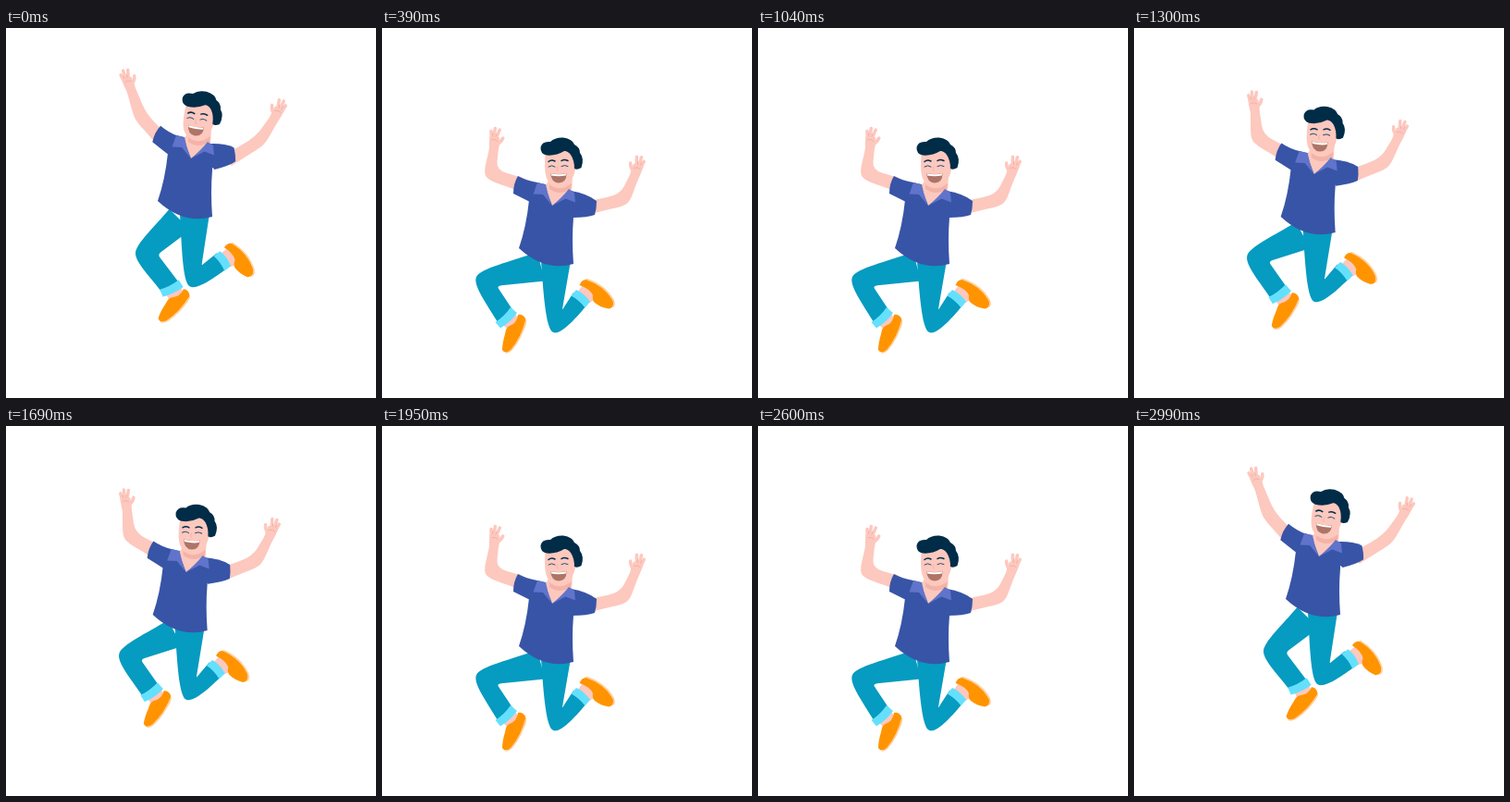
An HTML page for the animation above (3.12 s loop, 400 px wide and 400 px high).

```html
<!DOCTYPE html>
<html lang="en">
<head>
<meta charset="utf-8">
<title>Jumping man</title>
<style>
  html, body { margin: 0; width: 100%; height: 100%; overflow: hidden; background: #fff; }
  svg { display: block; width: 100%; height: 100%; }
  .skin { fill: #fdc8be; }
  .pants { fill: #069bc0; }
  .cuff { fill: #64e0fd; }
  .shoe { fill: #ff9400; }
  .sole { fill: none; stroke: #ffcf9c; stroke-width: 1.6; stroke-linecap: round; }
  .shirt { fill: #3854a6; }
  .flap { fill: #5f74ca; }
  .hair { fill: #002c47; }
  .brow { fill: none; stroke: #002c47; stroke-width: 1.5; stroke-linecap: round; }
  .eye { fill: none; stroke: #24507a; stroke-linecap: round; }
  .finger { fill: none; stroke: #fdc8be; stroke-width: 3.5; stroke-linecap: round; }
  .crease { fill: none; stroke: #eda99f; stroke-width: .7; stroke-linecap: round; }
</style>
</head>
<body>
<svg viewBox="0 0 400 400">
  <defs>
    <g id="hand">
      <path class="skin" d="M-5 1Q-6 -6 -6 -12Q0 -16 5 -12Q6 -5 5 1Z"/>
      <path class="finger" d="M-4 -11L-5 -18M-1.5 -12L-1 -21.5M1.5 -12L4 -20.5M3 -5Q7 -7 8.5 -12"/>
      <path class="crease" d="M-3.5 -9Q0 -11 3 -8M-2.7 -13L-3 -16M.6 -13L1.3 -16"/>
    </g>
  </defs>

  <g id="body">
    <path id="armL" class="skin"/>
    <path id="armR" class="skin"/>
    <g id="handL"><use href="#hand"/></g>
    <g id="handR"><use href="#hand" transform="scale(-1 1)"/></g>

    <path id="legR" class="pants"/>
    <g id="footR"><g transform="translate(-214 -293)">
      <path class="skin" d="M211 286L217 278Q228 283 230 294L222 298Z"/>
      <path class="shoe" d="M213.5 278Q216 271 222 272Q240 279 249 293Q253 302 245 303.5Q236 302 230 297Q227 294 228 289Q225 282 213.5 278Z"/>
      <path class="sole" d="M221 271.5Q241 278 250 294Q252 298 250 301"/>
      <path class="cuff" d="M204.5 289.5L210 283Q219 287 225 296L219.5 302.5Q213 294 204.5 289.5Z"/>
    </g></g>
    <path id="legL" class="pants"/>
    <g id="footL"><g transform="translate(-134.5 -313.5)">
      <path class="skin" d="M131 321L144 309L149 316L137 327Z"/>
      <path class="shoe" d="M147 310Q152 309 155 314Q157 320 153 326Q146 343 139 349Q133 353 130 348Q130 341 133 331Q134 323 138 322Q146 319 147 310Z"/>
      <path class="sole" d="M155.5 317Q151 335 140 348Q137 351 134 351"/>
      <path class="cuff" d="M122.5 318Q132 312 139 302L146 308Q139 318 128 324.5Z"/>
    </g></g>

    <path id="sleeveL" class="shirt" d="M168 167Q156 165 147 160Q142 168 142 179L160 188L176 192Z"/>
    <path id="sleeveR" class="shirt" d="M204 176Q222 179 232 187Q232 195 230 202Q222 205 206 205L196 190Z"/>
    <path class="shirt" d="M168 167L207 177V205Q205 228 207 255Q176 264 148 238Q156 215 159 186Z"/>
    <path class="skin" d="M181 164L206 160L205 177L184 192L176 171Z"/>
    <path fill="#f4b3a7" d="M181 169Q192 178 205 168L204 174Q192 182 181 174Z"/>
    <path class="flap" d="M168 167L177 169Q179 180 183.5 191.5L174 180L163.5 179.5Z"/>
    <path class="flap" d="M202 174L208 178L209 188.5L198.5 184.5L184 192Q195 183 202 174Z"/>

    <g id="head"><g transform="translate(-190 -149)">
      <path class="skin" d="M177 132Q174 158 180 166Q185 173 193 172Q206 169 209 153L210 134Z"/>
      <path class="hair" d="M178 137.5Q171 136 171.5 129Q173 122 182 123Q187 118 196 118.5Q206 120 208 126Q214 129 214 135Q219 141 215.5 151Q211 154 208 152Q208 143 204 137Q201 133 197 133Q188 138.5 178 137.5Z"/>
      <path class="brow" d="M180 144.5Q183 142 187 144M194 143.5Q197 141.5 201 143.5"/>
      <path class="eye" d="M180 150Q183.5 147.5 187 150M194 149.5Q197.5 147.5 201 149.5"/>
      <path class="crease" d="M190 150Q188 154 190.5 154.5"/>
      <path fill="#ad7567" d="M182 157Q191 159 199.500 157Q199.500 167.500 191 167.500Q183 167 182 157Z"/>
      <path fill="#fff" d="M182.500 157.300Q191 159 199.200 157.300L198.700 159.500Q191 161 183 159.500Z"/>
    </g></g>
  </g>
</svg>
<script>
const STEP = 130;

// Joints relative to the body as [high, mid, low]: x, y and, where needed, angle
const joints = {
  elbowL: [[130, 147], [118, 157], [120, 153]],
  wristL: [[119, 117], [121, 130], [121, 125]],
  elbowR: [[258, 173], [261, 185], [261, 180]],
  wristR: [[274, 149], [273, 160], [267, 149]],
  kneeL: [[136, 295], [113, 274], [115, 281]],
  ankleL: [[163, 333, 17], [134.5, 313.5, 0], [134, 321, 8]],
  kneeR: [[189, 319], [190, 317], [184, 317]],
  ankleR: [[217, 303, 13], [214, 293, 0], [210, 304, 12]],
  head: [[190, 149, 9], [190, 149, 0], [187, 147, -1]]
};
const shoulderL = [150, 169], shoulderR = [224, 194];
const hipL = [172, 258], hipR = [188, 252];

const el = id => document.getElementById(id);
const add = (p, d, k) => [p[0] + d[0] * k, p[1] + d[1] * k];
const mix = (p, q, k) => [p[0] + (q[0] - p[0]) * k, p[1] + (q[1] - p[1]) * k];
const unit = ([x, y]) => { const l = Math.hypot(x, y); return [x / l, y / l]; };
const text = (...points) => points.map(p => p.map(v => v.toFixed(2)).join(" ")).join(" ");

// Tapered two-part limb: round outside of the bend, inside softened by "soft"
function limb(id, a, b, c, [wa, wb, wc], round, soft) {
  const d1 = unit(add(b, a, -1)), d2 = unit(add(c, b, -1));
  const side = Math.sign(d1[0] * d2[1] - d1[1] * d2[0]);
  const normal = ([x, y]) => [y * side, -x * side];
  const along = unit(add(d1, d2, 1));
  const n1 = normal(d1), n2 = normal(d2), n = normal(along);
  const a1 = add(a, n1, wa), a2 = add(a, n1, -wa);
  const c1 = add(c, n2, wc), c2 = add(c, n2, -wc);
  const outer = add(b, n, wb), inner = add(b, n, -wb);
  el(id).setAttribute("d",
    "M" + text(a1) +
    "C" + text(mix(a1, add(b, n1, wb), .5), add(outer, along, -round), outer) +
    "C" + text(add(outer, along, round), mix(c1, add(b, n2, wb), .5), c1) +
    "L" + text(c2, mix(inner, c2, soft)) +
    "Q" + text(inner, mix(inner, a2, soft)) +
    "L" + text(a2) + "Z");
}

function place(id, [x, y], angle = 0) {
  el(id).setAttribute("transform", `translate(${x} ${y}) rotate(${angle})`);
}

// Direction from elbow to wrist, in degrees from upright
const lean = (e, w) => Math.atan2(w[0] - e[0], e[1] - w[1]) * 180 / Math.PI;

// s runs from 0 at the top of the jump to 5 at the bottom
function draw(s) {
  const up = Math.max(0, 1 - s / 3), down = Math.max(0, (s - 3) / 2);
  const rise = up * up, drop = down * down;
  const j = {};
  for (const id in joints) {
    const [high, mid, low] = joints[id];
    j[id] = mid.map((m, i) => m + rise * (high[i] - m) + drop * (low[i] - m));
  }

  place("body", [16 * up - 5 * down, 57 * down - 51 * up]);
  limb("armL", shoulderL, j.elbowL, j.wristL, [7.5, 6.5, 5], 7, .4);
  limb("armR", shoulderR, j.elbowR, j.wristR, [7, 6, 5], 7, .4);
  limb("legL", hipL, j.kneeL, j.ankleL, [16, 12, 10.5], 10, .1);
  limb("legR", hipR, j.kneeR, j.ankleR, [16, 13, 10], 9, .05);
  place("handL", j.wristL, lean(j.elbowL, j.wristL));
  place("handR", j.wristR, lean(j.elbowR, j.wristR) - 8);
  place("footL", j.ankleL, j.ankleL[2]);
  place("footR", j.ankleR, j.ankleR[2]);
  place("head", j.head, j.head[2]);
  el("sleeveL").setAttribute("transform", `rotate(${12 * rise} 165 178)`);
  el("sleeveR").setAttribute("transform", `rotate(${-14 * rise - 8 * drop} 204 190)`);
}

const start = performance.now();
let shown = -1;

// Six poses down, then the same six back up
function tick(now) {
  const n = Math.floor(Math.max(0, now - start) / STEP) % 12;
  const pose = Math.min(n, 11 - n);
  if (pose !== shown) draw(shown = pose);
  requestAnimationFrame(tick);
}
tick(start);
</script>
</body>
</html>
```
